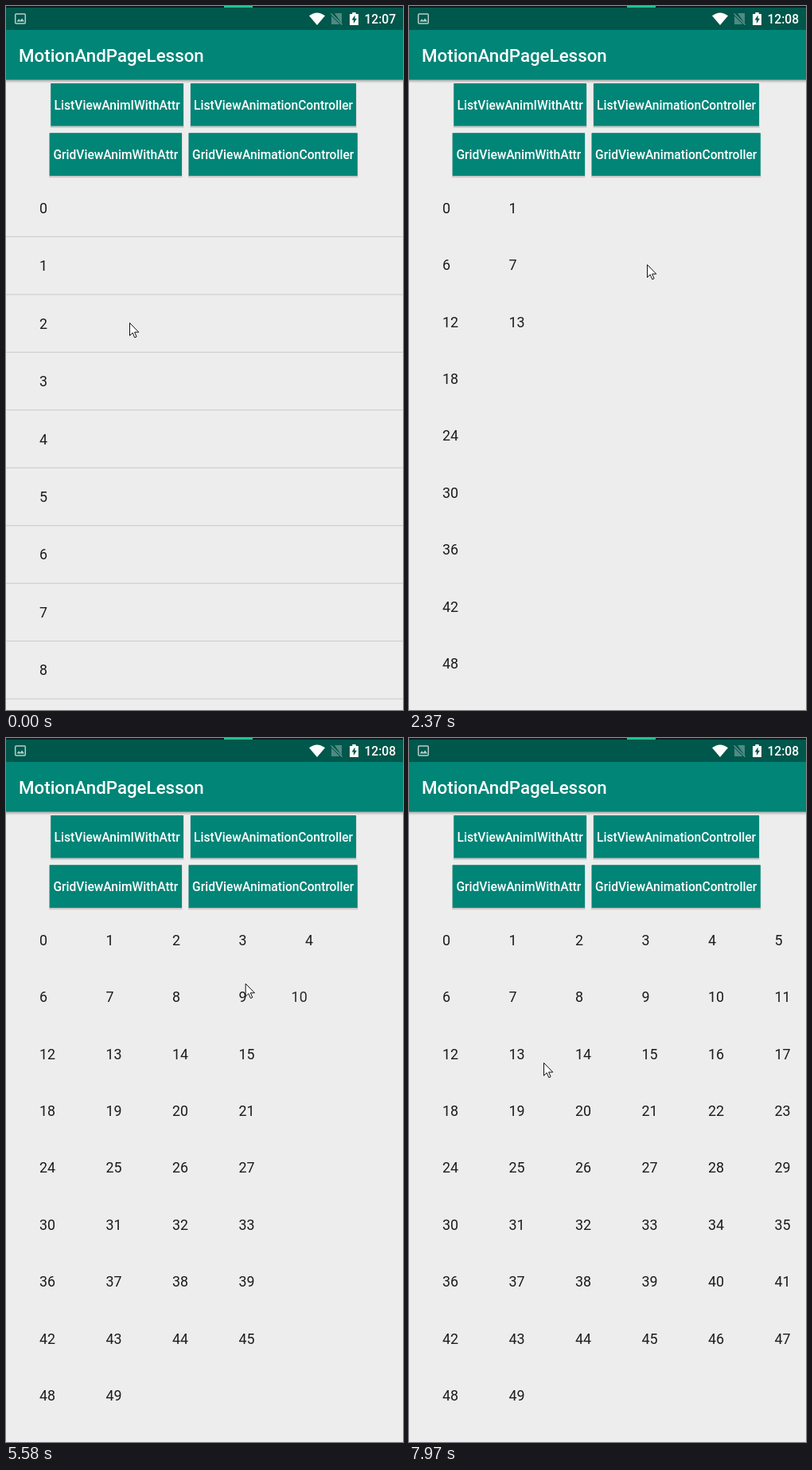
Recreate the animation shown at these times as an HTML page. Size 499 by 883 pixels, loop 8000 ms.

```html
<!DOCTYPE html>
<html lang="en">
<head>
<meta charset="utf-8">
<title>List and grid entrance</title>
<style>
  html, body { margin: 0; width: 100%; height: 100%; overflow: hidden; background: #ededed; }
  svg { display: block; width: 100%; height: 100%; font-family: Roboto, sans-serif; }
  .item { font-size: 17.85px; fill: #1c1c1c; }
  .label { font-size: 15.6px; font-weight: 500; fill: #fff; text-anchor: middle; }
  .title { font-size: 22.3px; font-weight: 500; fill: #fff; }
  .clock { font-size: 15.6px; font-weight: 500; fill: #fff; }
</style>
</head>
<body>
<svg id="stage" viewBox="0 0 499 883">
  <defs>
    <linearGradient id="shade" x2="0" y2="1">
      <stop stop-color="#000" stop-opacity=".3"/>
      <stop offset="1" stop-color="#000" stop-opacity="0"/>
    </linearGradient>
  </defs>
  <rect width="499" height="883" fill="#ededed"/>
  <g id="list"></g>
  <g id="grid"></g>
  <g id="buttons"></g>

  <rect y="92" width="499" height="5" fill="url(#shade)"/>
  <rect y="30" width="499" height="62.5" fill="#008577"/>
  <rect width="499" height="30" fill="#00574b"/>
  <rect width="499" height="2" fill="#0b1c22"/>
  <rect x="274" width="36" height="2" fill="#1fc796"/>
  <text class="title" x="16" y="70">MotionAndPageLesson</text>

  <g fill="none" stroke="#b5cfcb" stroke-width="1.5">
    <rect x="11.7" y="10" width="12.6" height="12" rx="1.2"/>
    <path d="M13.5 19.5l2.6-3.2 1.8 2 2.2-2.8 3 4z" fill="#b5cfcb" stroke="none"/>
  </g>
  <path d="M381 12.2Q391 4.6 401 12.2L391 24Z" fill="#fff"/>
  <path d="M413 9h9v13zM409 12.5v10.5h10.5z" fill="#4f8a82"/>
  <path d="M408.5 9.5l14 14" stroke="#5f958e" stroke-width="1.4"/>
  <path d="M432 10h3.3v-2h4.4v2h3.3v14h-11z" fill="#fff"/>
  <path d="M438.6 11.5l-4 6h2.3v4.5l4-6.2h-2.3z" fill="#00574b"/>
  <text class="clock" id="clock" x="450.5" y="22"></text>

  <path id="cursor" d="M.5.5v16l3.7-3.6 2.5 5.9 2.4-1-2.5-5.7h5.2z" fill="#fff" stroke="#111"/>
</svg>
<script>
const LOOP = 8000, LIST_HIDDEN = 720, CLOCK_TICK = 1300;
const ROWS = 9, COLUMNS = 6, ITEMS = 50, SLIDE = 249.5;
const SLIDE_STEPS = 1 / 0.75;   // an item starts every 0.75 of a slide's length

// [time, x, y] of the pointer
const POINTER = [
  [0, 155, 397], [660, 146.5, 192.5], [1000, 146.5, 192.5], [1750, 299, 324], [5500, 299, 324],
  [6000, 323, 91], [6450, 323, 91], [6740, 280, 131], [7150, 68, 330],
  [7550, 218, 416], [7780, 150, 412], [7970, 169, 407]
];
// [time, number of grid slots started]
const PROGRESS = [
  [904, 0], [2370, 11.75], [3860, 23.686], [4840, 31.686], [6330, 43.623], [6740, 46.7], [8000, 56.8]
];

const $ = id => document.getElementById(id);
const clamp = v => Math.min(1, Math.max(0, v));
const linear = v => v;
const smooth = v => v * v * (3 - 2 * v);
const accelerateDecelerate = v => 0.5 - 0.5 * Math.cos(Math.PI * v);

function add(parent, tag, attributes, text = '') {
  const node = document.createElementNS('http://www.w3.org/2000/svg', tag);
  for (const name in attributes) node.setAttribute(name, attributes[name]);
  node.textContent = text;
  return parent.appendChild(node);
}

function sample(keys, time, ease) {
  let i = 0;
  while (i < keys.length - 2 && time >= keys[i + 1][0]) i++;
  const [start, ...from] = keys[i], [end, ...to] = keys[i + 1];
  const part = ease(clamp((time - start) / (end - start)));
  return from.map((v, j) => v + (to[j] - v) * part);
}

function addButton(x, y, width, height, label) {
  add($('buttons'), 'rect', { x: x - 0.5, y: y + 1, width: width + 1, height: height + 1.2, fill: '#000', opacity: 0.16 });
  add($('buttons'), 'rect', { x, y, width, height, fill: '#008577' });
  add($('buttons'), 'text', { class: 'label', x: x + width / 2, y: y + 33 }, label);
}
addButton(56.3, 97, 166.7, 53.5, 'ListViewAnimIWithAttr');
addButton(232, 97, 208, 53.5, 'ListViewAnimationController');
addButton(54.7, 159.2, 166.3, 53.8, 'GridViewAnimWithAttr');
addButton(229.6, 159.2, 212.2, 53.8, 'GridViewAnimationController');

for (let i = 0; i < ROWS; i++) {
  add($('list'), 'text', { class: 'item', x: 42, y: 259.7 + i * 72.45 }, i);
  add($('list'), 'rect', { x: 0, y: 288.8 + i * 72.45, width: 499, height: 1.2, fill: '#cfcfcf' });
}

const cells = Array.from({ length: ITEMS }, (_, i) => {
  const column = i % COLUMNS, row = Math.floor(i / COLUMNS);
  const node = add($('grid'), 'text', { class: 'item', y: 259.7 + row * 71.4 }, i);
  return { node, x: 42 + column * 83.5, slot: column * ROWS + row };
});

function draw(time) {
  $('list').style.display = time < LIST_HIDDEN ? '' : 'none';
  $('clock').textContent = time < CLOCK_TICK ? '12:07' : '12:08';

  const [started] = sample(PROGRESS, time, linear);
  for (const { node, x, slot } of cells) {
    const shown = accelerateDecelerate(clamp((started - slot) * SLIDE_STEPS));
    node.setAttribute('x', x - SLIDE * (1 - shown));
    node.setAttribute('opacity', shown);
  }

  const [x, y] = sample(POINTER, time, smooth);
  $('cursor').setAttribute('transform', `translate(${x} ${y})`);
}

const begin = performance.now();
function tick() {
  draw((performance.now() - begin) % LOOP);
  requestAnimationFrame(tick);
}
tick();
</script>
</body>
</html>
```
